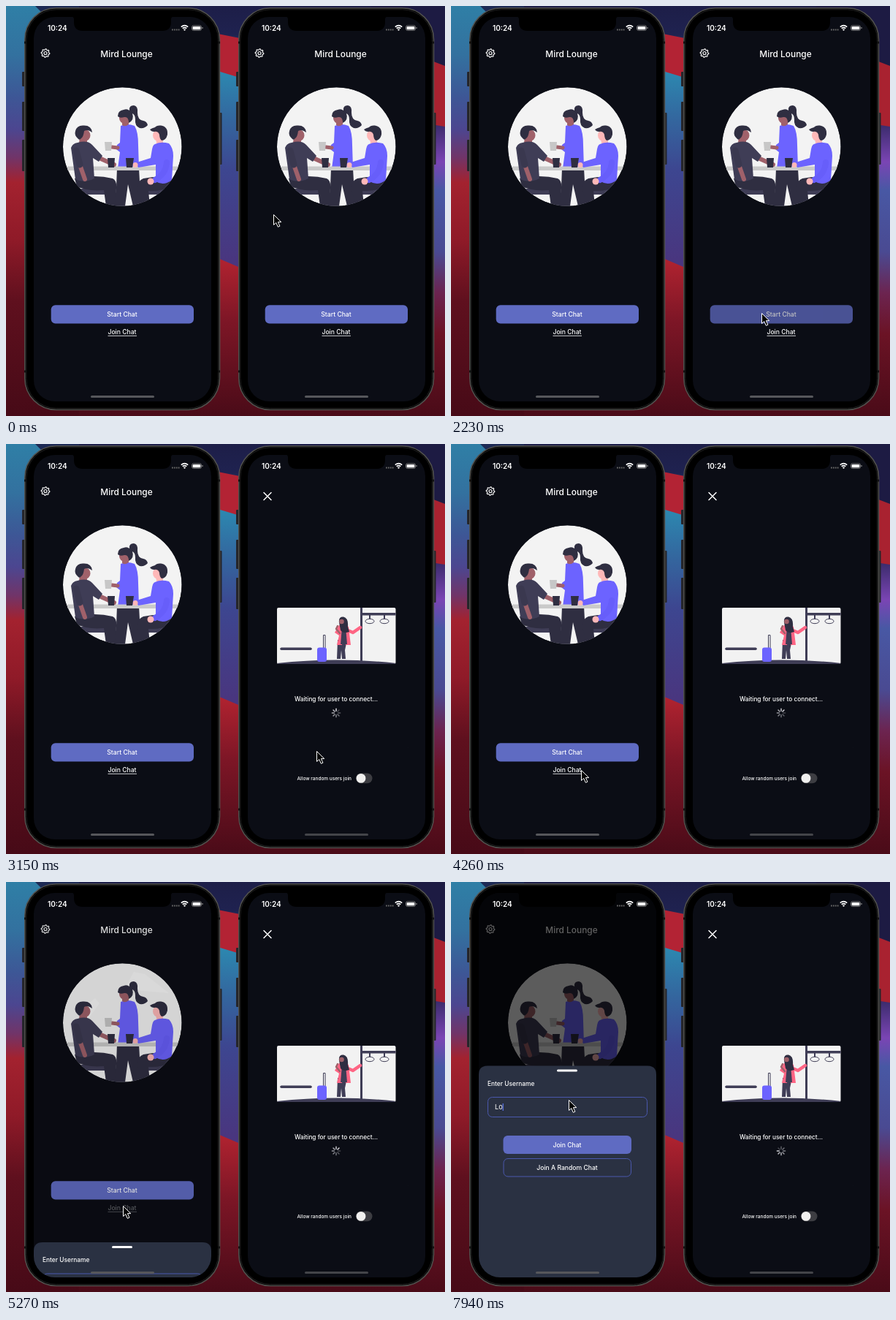
Animation of 601x561 px, one loop 8 s. Source, as an HTML page:

```html
<!DOCTYPE html>
<html lang="en">
<head>
<meta charset="utf-8">
<title>Chat app demo</title>
<style>
  html, body { margin: 0; width: 100%; height: 100%; overflow: hidden; background: #4a0b18; }
  svg { display: block; width: 100%; height: 100%; }
  text { font: 500 8.6px Inter, "Open Sans", sans-serif; fill: #fff; }
  .mid { text-anchor: middle; }
  .title { font-size: 11.9px; }
  .clock { font-size: 10px; font-weight: 600; }
  .field { font-size: 9.2px; font-weight: 400; }
  .dark { fill: #2f2e41; }
  .slate { fill: #3f3d56; }
  .violet { fill: #6c63ff; }
  .skin { fill: #a0616a; }
  .pink { fill: #ffb8b8; }
  .limb { fill: none; stroke-linecap: round; stroke-linejoin: round; }
  .outline { fill: none; stroke: #4a58ad; }
</style>
</head>
<body>
<svg viewBox="0 0 601 561">
  <defs>
    <linearGradient id="wallLeft" x2="0" y2="1">
      <stop offset="0" stop-color="#2f7fa6"/><stop offset=".12" stop-color="#33719f"/>
      <stop offset=".22" stop-color="#3d5796"/><stop offset=".3" stop-color="#4c4690"/>
      <stop offset=".37" stop-color="#713468"/><stop offset=".43" stop-color="#a3222f"/>
      <stop offset=".57" stop-color="#8f1a28"/><stop offset=".72" stop-color="#5f101e"/>
      <stop offset="1" stop-color="#470a17"/>
    </linearGradient>
    <linearGradient id="wallMid" x2="0" y2="1">
      <stop offset="0" stop-color="#1d1e48"/><stop offset=".07" stop-color="#1f2250"/>
      <stop offset=".16" stop-color="#2c88b0"/>
      <stop offset=".27" stop-color="#33689f"/><stop offset=".4" stop-color="#3d4690"/>
      <stop offset=".62" stop-color="#49367f"/>
    </linearGradient>
    <linearGradient id="wallRed" x2="0" y2="1">
      <stop offset="0" stop-color="#b12330"/><stop offset=".4" stop-color="#7d1626"/>
      <stop offset="1" stop-color="#4a0b18"/>
    </linearGradient>
    <linearGradient id="wallRight" x2="0" y2="1">
      <stop offset=".29" stop-color="#3b2c6c"/><stop offset=".38" stop-color="#7a45b4"/>
      <stop offset=".45" stop-color="#4858a4"/><stop offset=".6" stop-color="#4a4a92"/>
      <stop offset=".7" stop-color="#6c2450"/><stop offset=".8" stop-color="#6b1325"/>
      <stop offset="1" stop-color="#4a0b18"/>
    </linearGradient>
    <clipPath id="disc"><circle cx="159.300" cy="192.500" r="81.300"/></clipPath>
    <clipPath id="screen"><rect x="38" y="15" width="243" height="526" rx="29"/></clipPath>
    <clipPath id="card"><rect x="78" y="224" width="162.500" height="77" rx="2"/></clipPath>

    <g id="body">
      <g fill="#25252a">
        <rect x="22" y="90" width="5" height="20" rx="1"/>
        <rect x="22" y="131" width="5" height="40" rx="1"/>
        <rect x="22" y="183" width="5" height="43" rx="1"/>
        <rect x="291" y="146" width="4.500" height="71" rx="1"/>
      </g>
      <rect x="25.800" y="2.800" width="266.700" height="549.700" rx="43" stroke="#50504d" stroke-width="1.600"/>
      <rect x="27.800" y="4.800" width="262.700" height="545.700" rx="41" fill="none" stroke="#222"/>
      <path d="M25 50h3M290 50h3M25 500h3M290 500h3" stroke="#111" stroke-width="3"/>
      <rect x="38" y="15" width="243" height="526" rx="29" fill="#0b0d15"/>
    </g>

    <path id="notch" d="M90 14.500Q93 15 93 18V22Q93 34 105 34H214Q226 34 226 22V18Q226 15 229 14.500Z"/>

    <g id="status">
      <text class="clock" x="57" y="33.500">10:24</text>
      <path d="M227 32.500h10.500" stroke="#666" stroke-width="1.800" stroke-dasharray="1.800 1.100"/>
      <path d="M239.800 28.600Q244.500 24.600 249.200 28.600M241.700 30.700Q244.500 28.400 247.300 30.700"
        fill="none" stroke="#fff" stroke-width="1.700"/>
      <path d="M242.900 32.200Q244.500 31 246.100 32.200L244.500 34Z" fill="#fff"/>
      <rect x="254.500" y="26.800" width="13" height="6.500" rx="2" fill="none" stroke="#999" stroke-width=".8"/>
      <rect x="255.600" y="27.900" width="10.800" height="4.300" rx="1" fill="#fff"/>
      <path d="M269 29v2" stroke="#999"/>
    </g>

    <rect id="homeBar" x="116" y="533" width="87" height="3" rx="1.500"/>

    <g id="team" clip-path="url(#disc)">
      <circle cx="159.300" cy="192.500" r="81.300" fill="#f3f3f3"/>
      <path class="glow" d="M164 143L175 123 190 126 223 152 176 148ZM106 172L122 159 128 166 112 188Z" fill="#fff" opacity="0"/>

      <path class="dark" d="M152 222H182L183 240 189 274H174L167 244 163 274H148L151 248Z"/>
      <path class="violet" d="M157 164Q166 160 176 164Q181 172 181 190L182 222H153L156 200 151 196 152 190 156 187Z"/>
      <path class="skin" d="M159 154h9v8q-5 4-9 1Z"/>
      <circle class="skin" cx="162.500" cy="153.500" r="7.500"/>
      <path class="dark" d="M153 151Q153 143 161 142Q166 140 169 143Q168 136 175 136Q181 137 180 146Q180 156 188 157Q193 158 194 163Q190 168 183 167Q176 164 177 155Q177 149 173 147Q176 156 168 160Q168 151 162 152Q156 154 153 151Z"/>
      <path class="limb" d="M153 194L145 193" stroke="#a0616a" stroke-width="5"/>
      <path d="M135 186h10l-1 12h-8Z" fill="#c7c7c7"/>
      <rect x="84" y="219.500" width="157" height="5.500" fill="#cacaca"/>

      <rect class="slate" x="86" y="250" width="56" height="8" rx="4"/>
      <path class="dark" d="M94 236Q122 230 146 236Q152 239 151 249L150 274H137L134 252Q112 254 97 247Z"/>
      <path class="limb" d="M123 206L148 217" stroke="#a0616a" stroke-width="6"/>
      <path class="skin" d="M101 178h10v10q-5 4-11 0Z"/>
      <circle class="skin" cx="107.500" cy="177" r="8"/>
      <path class="dark" d="M99 182Q93 177 95 171Q97 163 106 163.500Q117 163 118 173Q112 168 107 171Q106 179 103 181Q101 184 99 182Z"/>
      <path class="slate" d="M98 187Q111 183 118 190L132 205 127 213 119 208 121 236Q107 243 95 237L89 194Q91 188 98 187Z"/>
      <path class="limb" d="M101 217L108 237" stroke="#a0616a" stroke-width="6"/>
      <path class="limb" d="M96 198L101 217" stroke="#3a384f" stroke-width="9"/>
      <path class="dark" d="M139 208h10l-1 13h-8Z"/>

      <rect class="slate" x="188" y="250" width="38" height="8" rx="4"/>
      <path class="dark" d="M227 235Q208 232 188 236Q180 239 180 249L185 274H197L195 253Q215 254 227 246Z"/>
      <path class="pink" d="M205 178h10v10h-9Z"/>
      <circle class="pink" cx="209" cy="177" r="8"/>
      <path class="dark" d="M197 169Q200 167 204 166Q206 163 212 163.500Q222 165 221 176Q219 184 213 184Q210 181 210 176Q208 171 203 172Q199 172 197 169Z"/>
      <path class="violet" d="M204 189Q212 185 223 188Q229 194 229 205L227 238Q216 247 205 240L205 217 181 221 179 214 198 208 200 196Q201 190 204 189Z"/>
      <circle class="pink" cx="177" cy="217.500" r="3.500"/>
      <path class="limb" d="M220 214Q219 230 204 238" stroke="#675efa" stroke-width="8"/>
      <circle class="pink" cx="198" cy="240" r="4.500"/>
      <path class="dark" d="M164 208h11l-2 13h-8Z"/>
    </g>

    <g id="station" clip-path="url(#card)">
      <rect x="78" y="224" width="163" height="77" fill="#f2f2f2"/>
      <path class="slate" d="M78 300Q159 291 241 300V302H78ZM192 224h3v73h-3ZM195 231h46v3.500h-46Z"/>
      <path class="limb" d="M84 280.300H124" stroke="#3f3d56" stroke-width="3.500"/>
      <g fill="none" stroke="#3f3d56">
        <path d="M205 234v5M225 234v5" stroke-width="2"/>
        <ellipse cx="205" cy="242.500" rx="6" ry="3.200"/><ellipse cx="225" cy="242.500" rx="6" ry="3.200"/>
        <path d="M141.500 279V261.500h2.500V279"/>
      </g>
      <rect class="violet" x="133" y="278.500" width="13" height="19.500" rx="3"/>
      <path class="slate" d="M161 268h13l-3 14 1 12h-5l-1-12-1 12h-5Z"/>
      <path class="limb" d="M175 255L182 258 192 251" stroke="#ff6584" stroke-width="4.500"/>
      <path d="M163 248Q171 244 176 250L179 275H172L170 259 167 275H160L163 262 157 258Z" fill="#ff6584"/>
      <path d="M167 250h5l2 24h-9Z" class="slate"/>
      <path d="M163 244Q162 236 169 236.500Q176 238 175 250L177 257Q169 260 165 255Z" class="dark"/>
      <circle class="skin" cx="166.500" cy="243" r="3.300"/>
      <path class="limb" d="M164 259L159 253 161 249" stroke="#a0616a" stroke-width="2.500"/>
    </g>
  </defs>

  <rect width="601" height="561" fill="url(#wallMid)"/>
  <rect width="100" height="561" fill="url(#wallLeft)"/>
  <path d="M40 0H100V60Z" fill="#1d2a55"/>
  <path d="M280 36L330 46V101L280 86Z" fill="#b32334"/>
  <path d="M100 345H290L330 362H500V561H100Z" fill="url(#wallRed)"/>
  <rect x="500" width="101" height="561" fill="url(#wallRight)"/>
  <path d="M500 0H601V82L500 62Z" fill="#1d1b43"/>
  <path d="M575 72L601 82V165L575 161Z" fill="#a92230"/>

  <g>
    <use href="#body"/>
    <g clip-path="url(#screen)">
      <g id="leftHome"></g>
      <use href="#notch"/>
      <rect id="dim" x="38" y="15" width="243" height="526"/>
      <g id="sheet">
        <path d="M38 541V263.500Q38 251.500 50 251.500H269Q281 251.500 281 263.500V541Z" fill="#2a3142"/>
        <rect x="145" y="256.500" width="28" height="3" rx="1.500" fill="#fff"/>
        <text x="50" y="278.500" style="font-size:8.4px">Enter Username</text>
        <rect class="outline" x="50.500" y="294.500" width="218" height="27" rx="6"/>
        <text id="entry" class="field" x="60" y="311.300"></text>
        <path id="caret" d="M0 303v10" stroke="#5e78f0" stroke-width="1.200"/>
        <rect x="71.500" y="347" width="175.500" height="25" rx="6" fill="#5f6bc2"/>
        <text class="mid" x="159" y="362.500">Join Chat</text>
        <rect class="outline" x="72" y="378.500" width="174.500" height="24.500" rx="6"/>
        <text class="mid" x="159" y="393.800">Join A Random Chat</text>
      </g>
      <use href="#homeBar" fill="#56575b"/>
    </g>
    <use href="#status"/>
  </g>

  <g transform="translate(293)">
    <use href="#body"/>
    <g clip-path="url(#screen)">
      <g id="rightHome"></g>
      <g id="waiting">
        <path d="M60 66.500l10 10m0-10l-10 10" stroke="#fff" stroke-width="1.500" stroke-linecap="round"/>
        <use href="#station"/>
        <text class="mid" x="159" y="352.300" style="font-size:8.25px">Waiting for user to connect...</text>
        <g id="spinner"></g>
        <text x="105.500" y="460" style="font-size:6.5px">Allow random users join</text>
        <rect x="186" y="450.500" width="22.500" height="13.800" rx="6.900" fill="#3d3d42"/>
        <circle cx="193" cy="457.400" r="6.400" fill="#f1f0ef"/>
      </g>
      <use href="#notch"/>
      <use id="rightBar" href="#homeBar"/>
    </g>
    <use href="#status"/>
  </g>

  <path id="cursor" d="M.5 .5V14.500L3.800 11.500 6.300 17.300 8.900 16.200 6.400 10.600H10.800Z" stroke="#fff"/>
</svg>

<script>
const LOOP = 8000;
const $ = id => document.getElementById(id);
const ramp = (t, from, to) => Math.min(1, Math.max(0, (t - from) / (to - from)));
const easeOut = p => 1 - (1 - p) ** 3;
const show = (el, on) => { el.style.display = on ? '' : 'none'; };

const gear = Array.from({ length: 32 }, (_, i) => {
  const a = i * Math.PI / 16, r = i % 4 < 2 ? 5.8 : 4.5;
  return [54 + r * Math.cos(a), 64.5 + r * Math.sin(a)].map(v => v.toFixed(2)).join();
}).join(' ');

const home = `
  <g fill="none" stroke="#fff" stroke-width="1.1" stroke-linejoin="round">
    <polygon points="${gear}"/><circle cx="54" cy="64.5" r="2"/>
  </g>
  <text class="mid title" x="165" y="69.5">Mird Lounge</text>
  ${$('team').outerHTML.replace('id="team"', '')}
  <g class="start">
    <rect x="61.700" y="409.300" width="195.300" height="25.300" rx="6" fill="#5f6bc2"/>
    <text class="mid" x="159" y="425">Start Chat</text>
  </g>
  <g class="join">
    <text class="mid" x="159" y="449.300">Join Chat</text>
    <path d="M139.500 451.300h39.500" stroke="#fff" stroke-width=".8"/>
  </g>`;
for (const id of ['leftHome', 'rightHome']) $(id).innerHTML = home;

$('spinner').innerHTML = Array.from({ length: 8 }, (_, i) =>
  `<path d="M0-2.800V-5.600" stroke="#e8e8ee" stroke-width="1.600" stroke-linecap="round"
    opacity="${0.25 + i * 0.09}" transform="rotate(${i * 45})"/>`).join('');

// Pointer stops: time, x, y
const pointer = [
  [0, 366, 285], [1469, 366, 285], [1470, 370, 288], [1990, 425, 420], [3150, 425, 420],
  [3910, 190, 444], [4260, 178, 446], [4600, 160, 443], [5410, 160, 443],
  [5730, 160, 385], [5910, 160, 375], [6150, 161, 298], [LOOP, 161, 298]
];

function pointerAt(t) {
  const i = pointer.findIndex(stop => stop[0] > t);
  const [t0, x0, y0] = pointer[i - 1], [t1, x1, y1] = pointer[i];
  const p = ramp(t, t0, t1), e = p * p * (3 - 2 * p);
  return [x0 + (x1 - x0) * e, y0 + (y1 - y0) * e];
}

function sheetAt(t) {
  if (t < 5270) return 0;
  if (t < 5410) return 0.166;
  return 0.45 + 0.55 * easeOut(ramp(t, 5410, 5730));
}

function drawLeft(t) {
  const open = sheetAt(t);
  $('leftHome').querySelector('.join').style.opacity = 1 - 0.65 * ramp(t, 4790, 4990);
  $('leftHome').querySelector('.glow').style.opacity = t >= 5270 && t < 5410 ? 0.5 : 0;
  $('dim').style.opacity = open < 0.2 ? open * 0.78 : open * 0.62;
  show($('sheet'), open > 0);
  $('sheet').setAttribute('transform', `translate(0 ${(1 - open) * 289.5})`);

  const typed = 'Lo'.slice(0, t < 7000 ? 0 : t < 7300 ? 1 : 2);
  const entry = $('entry');
  entry.textContent = typed || 'Username';
  entry.style.fill = typed ? '#fff' : '#535d78';
  const caretX = 60.5 + (typed ? entry.getComputedTextLength() : 0);
  $('caret').setAttribute('transform', `translate(${caretX})`);
  show($('caret'), t >= 6450 && (t < 7560 || t >= 7700));
}

function drawRight(t) {
  const waiting = t >= 2730;
  const rightHome = $('rightHome');
  show(rightHome, !waiting);
  show($('waiting'), waiting);
  rightHome.setAttribute('transform', `translate(${t >= 2640 ? -3 : 0})`);
  rightHome.querySelector('.start').style.opacity = 1 - 0.8 * ramp(t, 2150, 2400);
  rightHome.querySelector('.glow').style.opacity = t >= 2400 ? 0.9 : 0;
  $('rightBar').setAttribute('fill', t < 2400 ? '#56575b' : '#434449');
  $('spinner').setAttribute('transform', `translate(159 368) rotate(${Math.floor(t / 125) * 45})`);
}

function draw(t) {
  drawLeft(t);
  drawRight(t);
  $('cursor').setAttribute('transform', `translate(${pointerAt(t)})`);
}

const started = performance.now();
function tick() {
  draw((performance.now() - started) % LOOP);
  requestAnimationFrame(tick);
}
tick();
</script>
</body>
</html>
```
